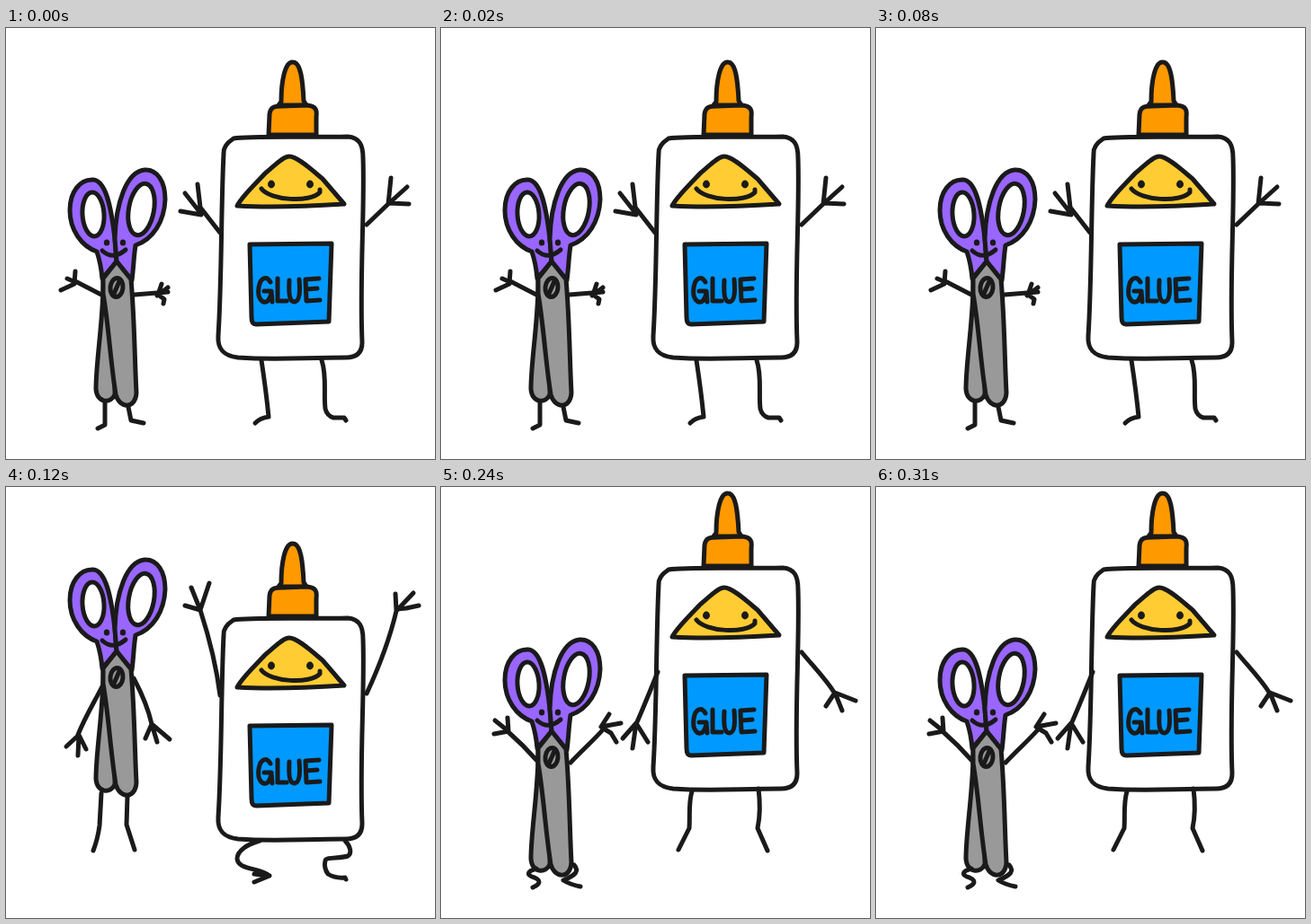
Write an HTML page with a canvas that moves like this. It is 477 by 480 pixels and loops after 0.36 s.

```html
<!DOCTYPE html>
<html lang="en">
<head>
<meta charset="utf-8">
<title>Dancing scissors and glue</title>
<style>
  html, body { margin: 0; width: 100%; height: 100%; overflow: hidden; background: #fff; }
  canvas { display: block; }
</style>
</head>
<body>
<canvas id="stage" width="477" height="480"></canvas>
<script>
const ctx = document.getElementById('stage').getContext('2d');
const INK = '#1a1a1a';
const PURPLE = '#9966ff', GREY = '#999999', ORANGE = '#ff9900';
const YELLOW = '#ffcc33', BLUE = '#0099ff', WHITE = '#ffffff';
const LINE = 5;
const POSE_MS = 120;

// Each pose shifts the rigid bodies vertically and swaps the limbs.
const poses = [
  {
    scissorsY: 0,
    glueY: 0,
    limbs: `M106 297L77 282M61 292L76 285L77 271M68 279L77 283
      M143 297L180 294M168 298L180 289M173 285L169 297L176 302L175 307
      M110 416L110 442L102 446M136 422L139 437L153 440
      M238 228L217 201M194 204L217 208L213 174M199 184L217 207
      M401 219L426 195L448 196M428 167L425 196L446 177
      M284 370C287 390 290 412 292 433Q283 434 277 440
      M351 370C357 388 353 406 355 424Q357 432 364 434L376 434L378 437`
  },
  {
    scissorsY: -77,
    glueY: 25,
    limbs: `M107 222C98 240 88 256 80 276M67 289L81 276L80 299M81 276L89 292
      M142 213C151 230 158 246 162 264M155 280L162 264L168 284M162 264L182 281
      M106 341L104 377Q102 392 97 405M135 344L134 376L143 404
      M238 232C234 200 226 168 216 137M199 132L216 137L226 107M206 112L216 137
      M401 230C414 202 426 172 434 138M433 119L434 138L453 118M434 136L445 135L459 132
      M282 394C268 398 257 405 257 414C258 427 284 424 293 433L276 440M276 431L293 433
      M377 394C383 400 385 408 380 411C370 414 356 412 355 416Q353 424 358 431Q366 436 377 435L378 437`
  },
  {
    scissorsY: 12,
    glueY: -31,
    limbs: `M106 304Q91 287 75 273M59 275L75 272L74 257M60 260L75 272
      M144 307C158 292 171 281 182 268M187 253L178 267L200 263M179 268L189 274L195 284
      M106 425C96 428 94 432 104 435Q115 440 102 446
      M148 421C154 428 150 432 136 438Q144 443 155 445
      M241 206C233 226 225 246 217 264M202 280L217 263L213 291M217 263L230 284
      M401 184C415 201 428 214 438 230M428 244L438 229L446 249M438 229L461 238
      M279 339C275 352 277 366 276 380L264 404M353 336C355 352 355 366 352 380L363 405`
  }
].map(pose => ({ ...pose, limbs: new Path2D(pose.limbs) }));

function shape(d, fill) {
  const path = new Path2D(d);
  if (fill) {
    ctx.fillStyle = fill;
    ctx.fill(path);
  }
  ctx.stroke(path);
}

function oval(x, y, rx, ry, tilt, fill, outlined = true) {
  ctx.beginPath();
  ctx.ellipse(x, y, rx, ry, tilt, 0, Math.PI * 2);
  ctx.fillStyle = fill;
  ctx.fill();
  if (outlined) ctx.stroke();
}

function face(eyes, y, size, smile) {
  for (const x of eyes) oval(x, y, size, size * 1.1, 0, INK, false);
  shape(smile);
}

function drawScissors() {
  shape(`M107 279C106 268 104 258 101 249C84 243 71 225 71 203
    C71 183 82 168 97 169C111 170 117 199 121 235L123 260Z`, PURPLE);
  shape(`M140 281C142 265 142 255 144 242C164 235 176 215 177 191
    C177 171 168 157 154 158C134 160 122 195 121 235L123 260Z`, PURPLE);
  oval(97, 207.5, 12, 24.5, -0.06, WHITE);
  oval(150.5, 202, 14, 29, 0.18, WHITE);
  shape(`M123 260L108 279C109 320 100 370 100 402
    C101 418 117 419 121 408Z`, GREY);
  shape(`M123 260L139 280C143 325 143 370 145 406C144 425 126 424 122 408
    C116 370 114 330 108 296L108 279Z`, GREY);
  oval(123, 289, 7, 10.5, 0.1, GREY);
  shape('M126 282L120 296');
  face([112, 130], 239, 3.2, 'M107 248Q119 259 133 247');
}

function drawGlue() {
  shape(`M303 86L306 82C306 60 310 37 319 38
    C328 38 330 60 331 81L334 86Z`, ORANGE);
  shape(`M292 119L293 96C294 87 300 87 308 87L335 86
    C345 87 346 92 345 99L345 119Z`, ORANGE);
  shape(`M253 123C272 120 330 122 380 121C393 122 397 130 397 145
    C399 200 393 280 396 350C396 362 389 367 378 367
    C330 367 300 370 258 367C242 365 235 358 236 343
    C240 280 239 200 242 140Q241 131 253 123Z`, WHITE);
  shape(`M257 198C262 188 275 176 288 162C300 152 308 143 315 143
    C324 143 340 158 352 168L376 196C345 198 290 200 257 198Z`, YELLOW);
  face([295, 338], 174, 4, 'M284 179C294 192 338 195 349 183L349 180');
  shape('M271 241L362 240L359 327L278 330Q273 330 273 322Z', BLUE);
  drawLabel();
}

function drawLabel() {
  const letters = [
    'M294 283C290 276 283 277 281 289C279 302 286 308 291 304Q295 299 295 293L287 293M295 293L296 305',
    'M302 279L302 304L312 304',
    'M315 281C314 300 316 305 321 305C327 304 327 292 326 280',
    'M348 279L333 280L334 304L349 303M334 291L346 290'
  ];
  for (const letter of letters) shape(letter);
}

function shifted(y, draw) {
  ctx.save();
  ctx.translate(0, y);
  draw();
  ctx.restore();
}

function render(now) {
  const pose = poses[Math.floor(now / POSE_MS) % poses.length];
  ctx.fillStyle = WHITE;
  ctx.fillRect(0, 0, 477, 480);
  ctx.strokeStyle = INK;
  ctx.lineWidth = LINE;
  ctx.lineCap = ctx.lineJoin = 'round';
  shifted(pose.scissorsY, drawScissors);
  shifted(pose.glueY, drawGlue);
  ctx.stroke(pose.limbs);
  requestAnimationFrame(render);
}

render(performance.now());
</script>
</body>
</html>
```
